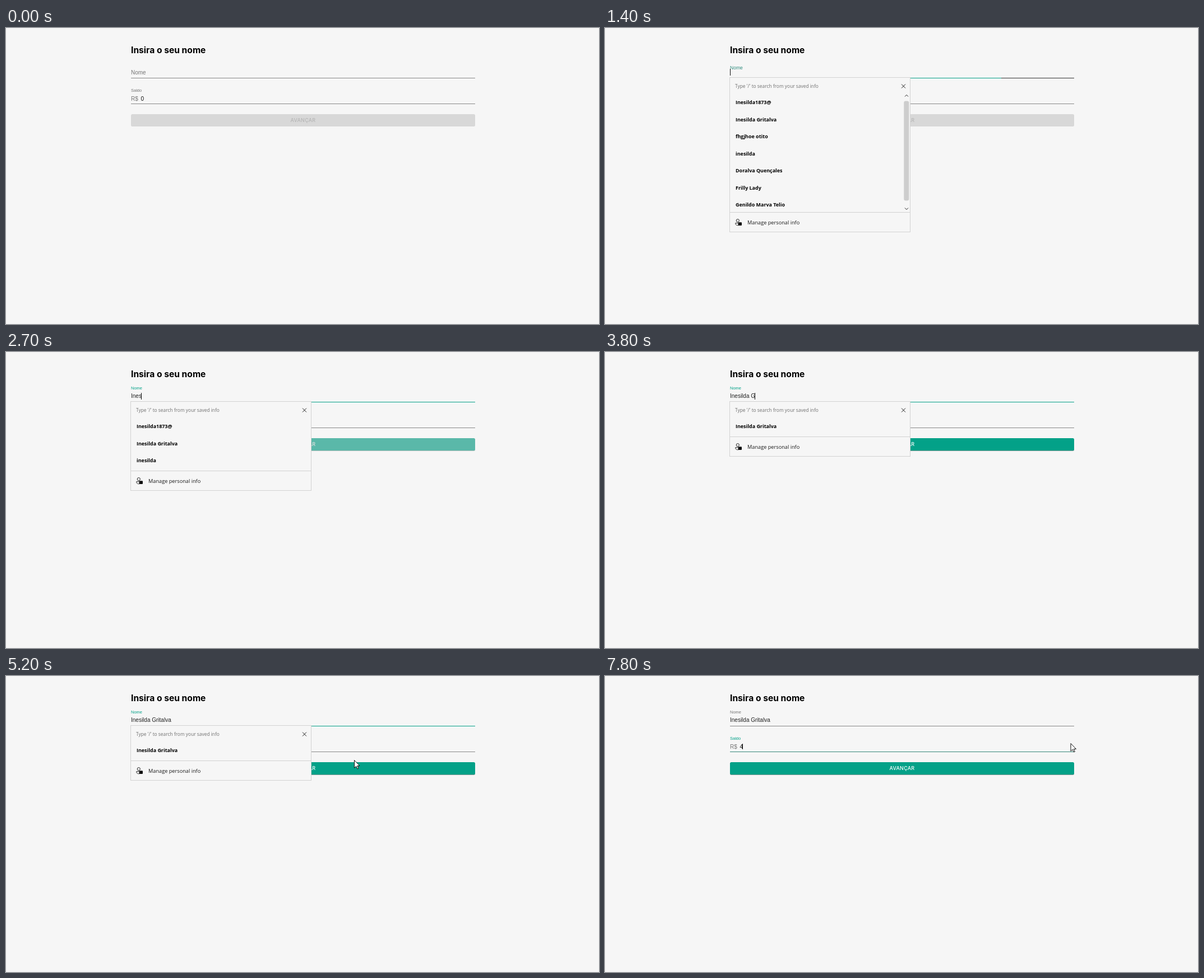
An HTML page that plays this animation: 1058 by 529 pixels, repeating every 8000 ms.

```html
<!DOCTYPE html>
<html lang="pt-BR">
<head>
<meta charset="utf-8">
<title>Insira o seu nome</title>
<style>
  html, body { margin: 0; width: 100%; height: 100%; overflow: hidden; }
  svg { display: block; width: 100vw; height: 100vh; background: #f6f6f6; }
  text { font: 10px "Liberation Sans", Arial, sans-serif; white-space: pre; }
  .title { font: 700 15.6px Inter, sans-serif; }
  .action { font: 500 8.96px Inter, sans-serif; letter-spacing: .02857em; text-anchor: middle; }
  .small { font-size: 7.5px; }
  .muted { fill: #757575; }
  .hint { font: 8.4px "Open Sans", sans-serif; fill: #707070; }
  .item { font: 700 8.95px "Open Sans", sans-serif; }
  .manage { font: 9.2px "Open Sans", sans-serif; fill: #1a1a1a; }
  .line { height: 1px; shape-rendering: crispEdges; }
  .border { fill: none; stroke: #d2d2d2; }
  .stroke { fill: none; stroke: #222; }
</style>
</head>
<body>
<svg viewBox="0 0 1058 529" preserveAspectRatio="none">
  <text class="title" x="223" y="44.5">Insira o seu nome</text>

  <text id="nameLabel">Nome</text>
  <text id="name" x="223" y="82" fill="#222"></text>
  <rect id="nameRule" class="line" x="223" y="89" width="614"/>
  <rect id="nameFocus" class="line" y="89" fill="#03a188"/>

  <text id="balanceLabel" class="small" x="223" y="114.3">Saldo</text>
  <text class="muted" x="223" y="129.7">R$</text>
  <text id="balance" x="240.4" y="129.7" fill="#111"></text>
  <rect class="line" x="223" y="135" width="614" fill="#888"/>
  <rect id="balanceFocus" class="line" y="135" fill="#35877b"/>
  <path id="spinner" d="M830 125l2.5-3 2.5 3zM830 126.5l2.5 3 2.5-3z" fill="#777"/>

  <rect id="shadow" x="223" y="155" width="614" height="22" rx="2.5" fill="#7d9a95"/>
  <rect id="button" x="223" y="154" width="614" height="22" rx="2.5"/>
  <text id="action" class="action" x="530" y="167.5">AVANÇAR</text>

  <g id="popup">
    <rect id="panel" x="222.5" y="88.5" width="322" fill="#f6f6f6" stroke="#d2d2d2"/>
    <text class="hint" x="232" y="107">Type '/' to search from your saved info</text>
    <path class="stroke" d="M529 100.5l7 7m0-7l-7 7"/>
    <g id="items"></g>
    <g id="scrollbar">
      <rect x="533.3" y="130.5" width="9" height="178" rx="3" fill="#cdcdcd"/>
      <path class="stroke" d="M535 122.5l3-3 3 3M535 321.5l3 3 3-3"/>
    </g>
    <g id="footer">
      <path class="border" d="M222.5 0h322"/>
      <circle class="stroke" cx="236.8" cy="14.7" r="2.6"/>
      <path class="stroke" d="M238 23.2c-4 .3-5.3-1.3-5.3-4h5"/>
      <rect x="237.5" y="17.7" width="6.5" height="5.8" rx="1" fill="#111"/>
      <text class="manage" x="254" y="21.5">Manage personal info</text>
    </g>
  </g>

  <rect id="caret" width="1" fill="#111"/>
  <path id="cursor" d="M.5 .5V14.3L3.7 11.3 5.9 16 7.9 15.1 5.8 10.5H10z" fill="#fff" stroke="#111" stroke-linejoin="round"/>
</svg>
<script>
const LOOP = 8000, STEP = 100;
const LEFT = 223, WIDTH = 614, ROW = 30.55;
const NAME_FOCUS = 1350, BALANCE_FOCUS = 5550;
const GREY = [117, 117, 117], TEAL = [3, 161, 136];

const FULL_NAME = 'Inesilda Gritalva';
const SAVED = ['Inesilda1873@', FULL_NAME, 'fhgjhoe otito', 'inesilda',
  'Doralva Quençales', 'Frilly Lady', 'Genildo Marva Telio'];

// Key points: time, then the values reached at that time.
const typing = [[2200, 0], [2300, 1], [2900, 6], [3100, 8], [3300, 9], [3800, 10], [4200, 12], [4800, 17]];
const counting = [[6700, 0], [6800, 1], [7300, 2], [7800, 4]];
const arriving = [[400, 83, 24], [600, 200, 105]];
const leaving = [[5100, 603, 164], [5200, 621, 150], [5300, 642, 138],
  [5700, 700, 146], [5900, 785, 152], [6300, 833, 115], [6600, 830.5, 120]];

const stage = document.querySelector('svg');
const ui = Object.fromEntries([...stage.querySelectorAll('[id]')].map(e => [e.id, e]));
const show = (el, on) => el.style.display = on ? '' : 'none';
const set = (el, attrs) => { for (const k in attrs) el.setAttribute(k, attrs[k]); };
const mix = (a, b, p) => `rgb(${a.map((v, i) => Math.round(v + (b[i] - v) * p))})`;

const progress = (t, start, length) => Math.min(1, Math.max(0, (t - start) / length));
const within = (t, from, to) => t >= from && t < to;
const easeOut = p => 1 - (1 - p) ** 3;
const easeInOut = p => p * p * (3 - 2 * p);

function along(keys, t) {
  const next = keys.findIndex(key => key[0] > t);
  if (next <= 0) return (next ? keys.at(-1) : keys[0]).slice(1);
  const [a, b] = [keys[next - 1], keys[next]];
  const p = progress(t, a[0], b[0] - a[0]);
  return a.slice(1).map((v, i) => v + (b[i + 1] - v) * p);
}

SAVED.forEach((_, i) => {
  const item = document.createElementNS(stage.namespaceURI, 'text');
  set(item, { class: 'item', x: 233, y: 136 + ROW * i });
  ui.items.append(item);
});

function drawFocusLine(el, p) {
  set(el, { x: LEFT + WIDTH * (1 - p) / 2, width: WIDTH * p });
}

function drawPopup(text, open) {
  show(ui.popup, open);
  const prefix = text.trim().toLowerCase();
  const found = SAVED.filter(name => name.toLowerCase().startsWith(prefix));
  [...ui.items.children].forEach((el, i) => el.textContent = found[i] || '');
  const full = found.length === SAVED.length;
  // A full list is clipped and scrolls.
  const divider = full ? 329.5 : 121 + 30.5 * found.length;
  set(ui.panel, { height: divider - 53.5 });
  set(ui.footer, { transform: `translate(0 ${divider})` });
  show(ui.scrollbar, full);
}

function drawCaret(t, text) {
  show(ui.caret, within(t, 1400, 1900) || within(t, 2300, 5100) || t >= 6500);
  const end = text ? ui.name.getComputedTextLength() - .6 : 0;
  set(ui.caret, t > BALANCE_FOCUS
    ? { x: 245, y: 121, height: 10 }
    : { x: Math.round(LEFT + end), y: 73, height: 12 });
}

function drawCursor(t) {
  show(ui.cursor, within(t, 400, 700) || within(t, 5100, 5400) || t >= 5700);
  set(ui.cursor, { transform: `translate(${along(t < 1000 ? arriving : leaving, t)})` });
}

function render(now) {
  const t = Math.floor(now % LOOP / STEP) * STEP;
  const raised = easeOut(progress(t, NAME_FOCUS, 200));
  const onBalance = easeOut(progress(t, BALANCE_FOCUS, 200));
  const onName = raised - onBalance;
  const hover = progress(t, 600, 200) - onBalance;
  const ready = easeInOut(progress(t, 2560, 250));
  const text = FULL_NAME.slice(0, Math.floor(along(typing, t)[0]));

  set(ui.nameLabel, {
    transform: `translate(${LEFT} ${83 - 15.6 * raised}) scale(${1 - .25 * raised})`,
    fill: mix(GREY, TEAL, onName)
  });
  ui.name.textContent = text;
  set(ui.nameRule, { fill: mix([136, 136, 136], [50, 50, 50], Math.max(0, hover)) });
  drawFocusLine(ui.nameFocus, onName);

  set(ui.balanceLabel, { fill: mix(GREY, TEAL, onBalance) });
  ui.balance.textContent = Math.floor(along(counting, t)[0]);
  drawFocusLine(ui.balanceFocus, onBalance);
  show(ui.spinner, t >= 6100);

  set(ui.button, { fill: mix([216, 216, 216], TEAL, ready) });
  set(ui.shadow, { opacity: ready });
  set(ui.action, { fill: mix([182, 182, 182], [255, 255, 255], ready) });

  drawPopup(text, within(t, 1400, 5400));
  drawCaret(t, text);
  drawCursor(t);
}

const start = performance.now();
function tick() {
  render(performance.now() - start);
  requestAnimationFrame(tick);
}
tick();
</script>
</body>
</html>
```
